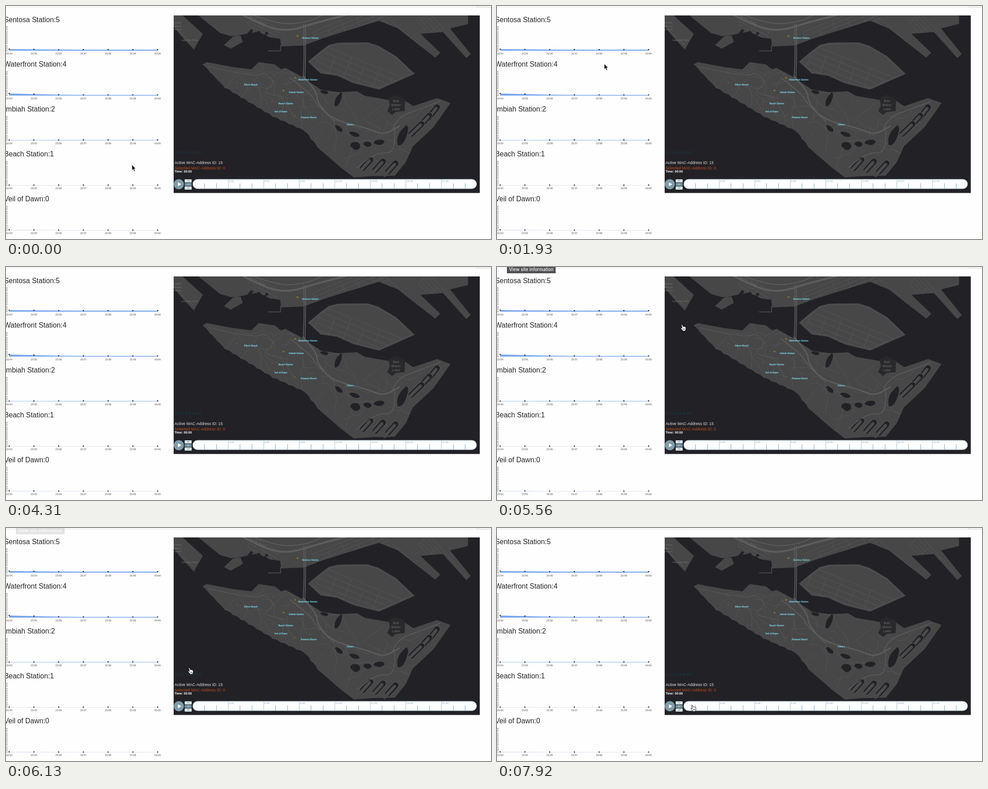
These frames come from a looping animation (1079 px wide and 519 px high, 8 s). An HTML page:

```html
<!DOCTYPE html>
<html lang="en">
<head>
<meta charset="utf-8">
<title>Station dashboard</title>
<style>
html, body { margin: 0; width: 100%; height: 100%; overflow: hidden; background: #fefefe; }
svg { display: block; width: 1079px; height: 519px; font-family: "Liberation Sans", Arial, sans-serif; }
</style>
</head>
<body>
<svg id="stage" viewBox="0 0 1079 519" xmlns="http://www.w3.org/2000/svg"></svg>
<script>
const LOOP = 8000;
const WATER = '#222126', LAND = '#474747', ROAD = '#5d5d5d', LANE = '#565656';

const tag = (name, attrs, body = '') =>
  `<${name} ${Object.entries(attrs).map(([k, v]) => `${k}="${v}"`).join(' ')}>${body}</${name}>`;
const text = (x, y, size, fill, str, extra = {}) =>
  tag('text', { x, y, 'font-size': size, fill, ...extra }, str);
const path = (d, fill = LAND, extra = {}) => tag('path', { d, fill, ...extra });
const line = (x1, y1, x2, y2, stroke, width = 1) =>
  path(`M${x1} ${y1}L${x2} ${y2}`, 'none', { stroke, 'stroke-width': width });
const rect = (x, y, width, height, fill, extra = {}) =>
  tag('rect', { x, y, width, height, fill, ...extra });
const range = n => [...Array(n).keys()];
const sum = (n, part) => range(n).map(part).join('');
const mid = { 'text-anchor': 'middle' };

function random(seed) {
  return () => (seed = seed * 16807 % 2147483647) / 2147483647;
}

// Smooth line through the midpoints of its key points.
function curve(str) {
  const p = str.split(' ').map(q => q.split(',').map(Number));
  let d = 'M' + p[0];
  for (let i = 1; i < p.length - 1; i++) {
    d += `Q${p[i]} ${(p[i][0] + p[i + 1][0]) / 2},${(p[i][1] + p[i + 1][1]) / 2}`;
  }
  return d + 'L' + p[p.length - 1];
}
const road = (str, width) => path(curve(str), 'none', { stroke: ROAD, 'stroke-width': width });

// Small bays bitten into a straight stretch of shore.
function bays(x1, y1, x2, y2, n, depth) {
  const dx = (x2 - x1) / n, dy = (y2 - y1) / n, len = Math.hypot(dx, dy);
  return sum(n, i => `Q${x1 + dx * (i + .5) - dy / len * depth},${y1 + dy * (i + .5) + dx / len * depth} ` +
    `${x1 + dx * (i + 1)},${y1 + dy * (i + 1)}`);
}

// Evenly spaced streets in a turned frame.
function streets(x, y, angle, across, down, gap) {
  return tag('g', { transform: `translate(${x} ${y}) rotate(${angle})` },
    sum(Math.floor(down / gap) + 1, i => line(0, i * gap, across, i * gap, LANE, .9)) +
    sum(Math.floor(across / 34) + 1, i => line(i * 34, (i % 2) * gap, i * 34, down - (i % 3) * gap, LANE, .9)));
}

// Winding lanes scattered along the length of the island.
function lanes(count) {
  const rnd = random(77);
  return sum(count, i => {
    const f = i / count;
    let x = 465 + 360 * f + rnd() * 50, y = 140 + 130 * f + (rnd() - .35) * (30 + 95 * f);
    let angle = .5 + (rnd() - .5) * 2;
    const points = range(6).map(() => {
      angle += (rnd() - .5) * 1.7;
      x += Math.cos(angle) * 12;
      y += Math.sin(angle) * 12;
      return `${x.toFixed(1)},${y.toFixed(1)}`;
    });
    return path(curve(points.join(' ')), 'none', { stroke: LANE, 'stroke-width': .9 });
  });
}

const turned = (x, y, angle, body) => tag('g', { transform: `translate(${x} ${y}) rotate(${angle})` }, body);
const pond = (x, y, rx, ry, angle) =>
  turned(x, y, angle, path(`M${-rx} 0Q${-rx} ${-ry} 0 ${-ry}T${rx} ${ry * .3}Q${rx * .4} ${ry * 1.3} ${-rx * .3} ${ry * .8}Z`, WATER));

// Hairpin basin around a spit of land with its own lane.
const basin = (x, y, length, width, angle) => turned(x, y, angle,
  rect(-length / 2, -width / 2, length, width, WATER, { rx: width / 2, stroke: LANE, 'stroke-width': 1 }) +
  rect(-length / 2 + 7, -width / 4, length, width / 2, LAND, { rx: width / 4 }) +
  line(-length / 2 + 11, 0, length / 2, 0, LANE));

// Counts settle from a starting height to a floor.
function chart(i, title, start, floor, color) {
  const top = i * 100, base = top + 99.5;
  const points = range(7).map(k => [7 + k * 55.05, base - floor - (start - floor) * Math.exp(-((k / 1.4) ** 2))]);
  const area = `M7 ${base}L${points.join('L')}V${base}Z`;
  return text(-4.3, 35.5 + i * 99.8, 15.7, '#262626', title) +
    sum(11, k => text(3.4, top + 49.3 + k * 5.15, 5.4, '#444', 100 - k * 10, { 'text-anchor': 'end' })) +
    path(area, color) +
    points.map(([x, y], k) => tag('circle', { cx: x, cy: y, r: 1.35, fill: '#222' }) +
      text(x, top + 107.6, 5.6, '#444', k < 6 ? `23:5${k + 4}` : '00:00', mid)).join('');
}

const COAST = {
  west: 'M373 21H393L438 62 418 97 391 68 373 46Z',
  main: 'M428 21L476 60 500 67 522 66 527 80 500 95 485 87 505 68 560 57 588 70 610 73 612 90 662 88 ' +
    '705 72 800 42 830 33 872 50 955 115 966 104 922 62 972 58 1024 116 1034 107 988 50 1028 40V21Z',
  isle: 'M672 124L697 103 718 87 738 82 804 81 829 89 868 112 909 151 830 186 774 172 736 155 700 150Z',
  south: 'M437 130L447 125 505 136 546 141 562 125 598 130 612 141 622 138 657 157 700 186 738 192 781 190 ' +
    '798 200 850 209 888 211 906 223 959 205 989 216 951 270 905 313 890 347 865 378 815 379 774 382 745 360 692 314' +
    bays(692, 314, 664, 279, 2, 4) + bays(664, 279, 593, 247, 4, 4) + bays(593, 247, 487, 183, 6, 4) +
    bays(487, 183, 437, 130, 3, 2) + 'Z'
};

const LABELS = [
  // name, center x, center y, marker width
  ['Sentosa Station', 677, 71, 5], ['Waterfront Station', 671.5, 164, 4.5], ['Siloso Beach', 544.5, 174.7, 1.2],
  ['Imbiah Station', 646, 192.2, 4.5], ['Beach Station', 622.5, 217.5, 1.2], ['Veil of Dawn', 611.5, 235.5, 0],
  ['Palawan Beach', 673.5, 248.4, 1.2], ['Others', 766, 264.3, 0]
];

const clip = (id, body) => tag('clipPath', { id }, body);
const inside = (id, body) => tag('g', { 'clip-path': `url(#${id})` }, body);

function waters() {
  return pond(708, 192, 9, 4, 8) + pond(739, 208, 17, 6, 110) + pond(740, 273, 10, 5, 35) +
    pond(775, 286, 12, 5, 15) + pond(777, 312, 11, 9, 0) + pond(804, 308, 9, 6, 0) +
    pond(830, 304, 12, 6, -10) + pond(882, 288, 24, 9, 110) +
    path('M851 206L866 198 888 208 887 234 867 236 859 243 848 234 854 221Z', '#29282b') +
    sum(3, i => basin(949 - i * 18, 238 + i * 18, 46, 14, 128 + i * 4)) +
    sum(3, i => basin(802 + i * 28, 352 + i * 4, 40, 14, 132));
}

function mainRoads() {
  return road('525,19 577,47 630,56 687,38 760,19', 4) +
    road('548,19 604,42 671,36 706,19', 1.8) +
    sum(2, i => road(`${662 + i * 4},40 ${664 + i * 3},90 ${661 + i * 4},165`, 1.8)) +
    road('660,155 692,190 692,214 725,253 804,272 839,288 876,267', 2.6) +
    road('632,160 678,195 689,216 731,257', 1.6) +
    road('860,275 869,248 925,228 966,212', 1.5) +
    road('864,270 869,328 824,326 780,361', 1.4) +
    road('450,135 548,158 580,147 599,174 568,192 625,205', 1) +
    road('380,52 403,75 418,86', 1);
}

function map() {
  const grey = '#727272';
  let m = rect(373, 21, 682, 396, WATER) + Object.values(COAST).map(d => path(d)).join('');
  m += sum(3, i => line(528 + i * 17, 76 + i * 2, 548 + i * 17, 53 + i * 3, WATER, 6));
  m += path('M583 100H611V87', 'none', { stroke: LAND, 'stroke-width': 2 });
  m += inside('isle', streets(706, 88, 22, 220, 92, 13) + path(COAST.isle, 'none', { stroke: LANE, 'stroke-width': 6 }) +
    path(COAST.isle, 'none', { stroke: LAND, 'stroke-width': 4 }));
  m += inside('main', streets(682, 58, -22, 170, 44, 9) + streets(840, 18, 41, 175, 40, 9) +
    streets(941, 15, 48, 150, 34, 8) + streets(548, 20, 28, 70, 24, 8));
  m += inside('south', lanes(54)) + waters() + mainRoads();

  m += ['Labrador', 'Nature', 'Reserve'].map((w, i) =>
    text(391, 39 + i * 7.5, 5.6, grey, w, { 'text-anchor': 'end', 'letter-spacing': .3 })).join('');
  m += text(408, 78, 5.8, grey, 'Labrador Park', mid);
  m += text(540, 24, 5.2, '#777', 'KEPPEL ROAD', { transform: 'rotate(27 540 24)', 'letter-spacing': .4 });
  m += ['Bali', 'Water', 'Lake'].map((w, i) =>
    text(868, 214 + i * 9, 7, '#747474', w, { ...mid, 'letter-spacing': .6 })).join('');

  for (const [name, x, y, mark] of LABELS) {
    m += rect(x - 31, y - 5, mark, 1.3, '#948a2b') + rect(x - 30, y - 3.2, mark / 2, 1, '#948a2b');
    m += text(x, y + 1.8, 4.9, '#7ee4fa', name, { ...mid, 'font-weight': 700 });
  }

  m += text(375, 329.3, 8.8, '#183e48', '1-2-0-1-8-2-4-0');
  m += text(375, 351.6, 8.8, '#e4e4e4', 'Active MAC-Address ID: 15');
  m += text(375, 363.6, 8.8, '#c24d1b', 'Selected MAC-Address ID: 0');
  m += text(375, 370.6, 7, '#fff', 'Time: 00:00', { 'font-weight': 700 });

  return tag('defs', {}, clip('frame', rect(373, 21, 681, 395.6, '#000')) +
    ['main', 'isle', 'south'].map(id => clip(id, path(COAST[id]))).join('')) + inside('frame', m + controls());
}

function controls() {
  let s = tag('circle', { cx: 384.5, cy: 397, r: 11.2, fill: '#7f9ba8' }) + path('M382.5 392.7V401.5L390 397.1Z', '#fff');
  ['x1', 'x2', 'x4'].forEach((w, i) => {
    const on = i === 1, y = 386 + i * 8;
    s += rect(397.5, y, 15.5, 7, on ? '#71909d' : '#dceaf0', { rx: 1 });
    s += text(405.2, y + 5.2, 5, on ? '#dceaf0' : '#55717e', w, mid);
  });
  s += rect(415.5, 386, 631.5, 21, '#fdfefe', { rx: 10.5, stroke: '#a3c2ca', 'stroke-width': 1 });
  for (let h = 1; h < 24; h++) {
    const x = Math.floor(415.3 + h * 26.35) + .5, major = h % 3 === 0;
    s += line(x, major ? 386 : 395, x, 407, major ? '#a5c5cd' : '#7da3af');
    if (major) s += text(x + 1.2, 391.8, 6, '#93adb4', `${h}:00`);
  }
  return s;
}

const ARROW = tag('g', { id: 'arrow' },
  path('M.5 .5V13.3L3.4 10.6L5.5 15.5L7.8 14.5L5.8 9.7H9.6Z', '#111', { stroke: '#fff' }));
const HAND = tag('g', { id: 'hand' },
  path('M2.2 1.5Q3.2 .1 4.4 1.5L6 5.4Q7.2 4.3 8.2 5.4Q9.5 4.7 10.3 6Q11.8 5.8 12.1 7.4L12 11L10.8 15H5.2L4 12.6L.9 9.3Q.5 7.6 2.2 7.9L4.1 9Z',
    '#fff', { stroke: '#111', 'stroke-width': .9, 'stroke-linejoin': 'round' }) +
  sum(3, i => line(5.9 + i * 1.7, 9.6, 6.1 + i * 1.7, 12.6, '#111', .7)));
const TOOLTIP = tag('g', { id: 'tip' }, rect(22, -8, 108.5, 22, '#515153') +
  text(27, 8.9, 9.8, '#fff', 'View site information', { style: 'font-family:Inter,sans-serif', 'font-weight': 500 }));

const stage = document.getElementById('stage');
stage.innerHTML = rect(0, 0, 1079, 519, '#fefefe') + line(0, 2.5, 1079, 2.5, '#e2e2e2') +
  rect(1047.5, -12, 50, 14.5, '#fefefe', { rx: 3, stroke: '#c8c8c8' }) +
  chart(0, 'Sentosa Station:5', 3.5, 2.3, '#72a3ee') +
  chart(1, 'Waterfront Station:4', 4.6, 1.5, '#72a3ee') +
  chart(2, 'Imbiah Station:2', .9, 1.3, '#9cc0f0') +
  chart(3, 'Beach Station:1', .6, .6, '#bccbe6') +
  chart(4, 'Veil of Dawn:0', .8, .4, '#bccbe6') +
  map() + TOOLTIP + ARROW + HAND;

// Each move runs in held steps from its first to its last time; bow bends it to the right.
const move = (first, last, steps, from, to, bow = 0) => ({ first, last, steps, from, to, bow });
const AWAY = [-60, -60];
const ARROW_MOVES = [
  move(0, 0, 1, AWAY, [279.5, 353]),
  move(140, 290, 2, [272, 215], [265, 108.5]),
  move(890, 1330, 4, [266, 151], [272, 230]),
  move(1930, 2080, 2, [238, 128], [202, 38]),
  move(2380, 2520, 2, [192, 8], [182, -25]),
  move(3870, 4310, 4, [27, -12], [25, -20])
];
const HAND_MOVES = [
  move(0, 0, 1, AWAY, AWAY),
  move(5560, 6570, 8, [408, 127.5], [385, 391.5], 50),
  move(6720, 7170, 4, [385, 393], [381.5, 395.5]),
  move(7470, 7920, 4, [408, 396], [430.5, 393.5], 56)
];

// Progress of a move at time t, held between steps.
function progress({ first, last, steps }, t) {
  if (t >= last) return 1;
  const gap = (last - first) / (steps - 1);
  return Math.floor((t - first + 12) / gap) / (steps - 1);
}

function place(node, moves, t) {
  const m = moves.filter(({ first }) => first <= t).pop();
  const f = progress(m, t), p = f * (1.5 - .5 * f);
  const [x, y] = m.from.map((a, i) => a + (m.to[i] - a) * p);
  node.setAttribute('transform', `translate(${x + m.bow * Math.sin(Math.PI * (1 - f) ** 3)} ${y})`);
}

const [arrow, hand, tip] = ['arrow', 'hand', 'tip'].map(id => document.getElementById(id));
function draw() {
  const t = performance.now() % LOOP;
  place(arrow, ARROW_MOVES, t);
  place(hand, HAND_MOVES, t);
  const step = 5560 + progress(HAND_MOVES[1], t) * 1010;
  tip.setAttribute('opacity', t < 5560 ? 0 : Math.min(1, Math.max(0, (6210 - step) / 500)));
  requestAnimationFrame(draw);
}
draw();
</script>
</body>
</html>
```
